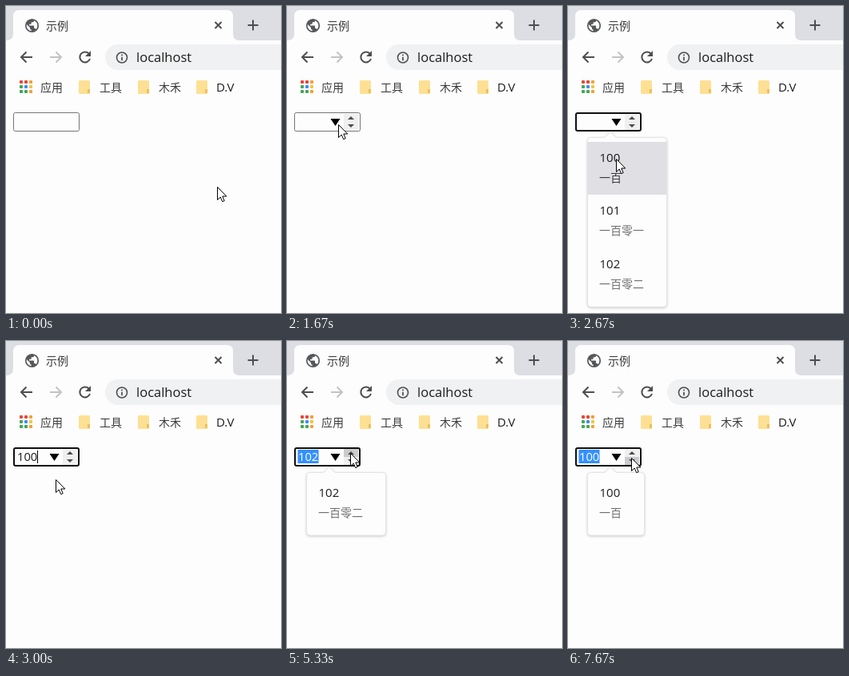
These frames come from a looping animation (344x384 px, 8330 ms). An HTML page:

```html
<!DOCTYPE html>
<html lang="zh">
<head>
<meta charset="utf-8">
<style>
html, body { margin: 0; height: 100%; overflow: hidden; background: #fdfdfd; }
svg { display: block; width: 100vw; height: 100vh; }
text { font: 15px "Open Sans", "Noto Sans CJK SC", "Noto Sans CJK", sans-serif; fill: #1c1c1c; }
.zh { font: 14px "Noto Sans CJK SC", "Noto Sans CJK", sans-serif; fill: #3a3b3d; }
.note { fill: #707070; }
.line { fill: none; stroke: #4c4e50; stroke-width: 2; }
.popup { fill: #fdfdfd; stroke: #e4e4e8; filter: drop-shadow(0 1px 1.5px #0003); }
</style>
</head>
<body>
<svg viewBox="0 0 344 384">
  <!-- tab strip -->
  <path fill="#dddee3" d="M0 0H344V43H292Q284 43 284 35V13Q284 5 276 5H17Q9 5 9 13V35Q9 43 0 43Z"/>
  <g transform="translate(22.200 14.200) scale(.86)">
    <circle cx="12" cy="12" r="10" fill="#55575a"/>
    <path fill="#fdfdfd" d="M11 19.900C7 19.400 4 16 4 12q0-1 .2-1.800L9 15v1q0 2 2 2zM17.900 17.400Q17.400 16 16 16h-1v-3q0-1-1-1H8v-2h2q1 0 1-1V7h2q2 0 2-2v-.4c6 2.600 6 9.400 2.900 12.800z"/>
  </g>
  <text class="zh" x="50" y="30">示例</text>
  <path class="line" d="M261.500 20l8 8M269.500 20l-8 8M309 17.500v13M302.500 24h13"/>
  <!-- toolbar -->
  <path class="line" d="M33 64H19M25.500 57.500L19 64l6.500 6.500"/>
  <path class="line" style="stroke:#c2c3c6" d="M55 64H69M62.500 57.500L69 64l-6.500 6.500"/>
  <path class="line" d="M104 60A6.500 6.500 0 1 0 105 66"/>
  <path fill="#4c4e50" d="M106 56v7h-7z"/>
  <path fill="#f0f1f3" d="M344 48H140a16 16 0 0 0 0 32H344Z"/>
  <circle class="line" cx="145" cy="64.500" r="6.500" style="stroke-width:1.600"/>
  <path class="line" style="stroke-width:1.700" d="M145 60.500v1.800M145 63.700v4.500"/>
  <text x="163" y="70" style="font-size:16.500px">localhost</text>
  <!-- bookmarks -->
  <g id="marks"></g>
  <!-- number field -->
  <rect id="field" fill="#fdfdfd"/>
  <g id="tools">
    <path d="M54.500 141h12l-6 9z" fill="#000"/>
    <rect x="71" y="135" width="18" height="20" fill="#efefef"/>
    <rect id="hot" x="71" width="18" height="10" fill="#cbcbcd"/>
    <path d="M76 142l4-4 4 4zM76 148l4 4 4-4z" fill="#4a4a4a"/>
  </g>
  <rect id="mark" x="13.500" y="136" width="26" height="17" fill="#3390ff"/>
  <text id="value" x="14" y="150" style="font-size:14.700px"></text>
  <path id="caret" stroke="#000" d="M0 137v16"/>
  <g id="list"></g>
  <path id="arrow" fill="#fff" stroke="#000" stroke-linejoin="round"
    d="M.5.5V16.500L4.200 13 6.700 18.700 9.200 17.600 6.800 12H11.800Z"/>
</svg>
<script>
const LOOP = 8330;
const words = { 100: '一百', 101: '一百零一', 102: '一百零二' };
const all = Object.keys(words);
const $ = id => document.getElementById(id);
const set = (id, attrs) => { for (const k in attrs) $(id).setAttribute(k, attrs[k]); };
const show = (id, on) => set(id, { visibility: on ? 'visible' : 'hidden' });

// start time, pointer position, changes to the field that persist
const steps = [
  [0, 264, 226, { value: '', items: [], tools: false, focus: false, caret: false, pick: false, sel: false, hot: 0 }],
  [330, 262, 225],
  [670, 160, 170],
  [1000, 88, 131],
  [1330, 68, 143, { tools: true }],
  [1670, 64, 148],
  [2000, 64, 148, { focus: true, caret: true, items: all }],
  [2330, 62, 174, { pick: true }],
  [2670, 60, 191, { caret: false }],
  [3000, 62, 173, { value: '100', items: [], pick: false, caret: true }],
  [3330, 72, 145, { hot: 135 }],
  [3670, 78, 141, { caret: false }],
  [4000, 79, 140, { caret: true }],
  [4330, 79, 140, { value: '101', items: ['101'], caret: false, sel: true }],
  [5330, 79, 140, { value: '102', items: ['102'] }],
  [6330, 79, 146, { hot: 145 }],
  [6670, 79, 146, { value: '100', items: ['100'] }]
];
let state = {};
const frames = steps.map(([t, x, y, change]) => state = { ...state, ...change, t, x, y });

function drawMarks() {
  const dots = ['#e5473a', '#e5473a', '#f2a03a', '#43a657', '#3f8cf0', '#f4c53a', '#43a657', '#43a657', '#f2a03a'];
  const labels = [[91, '工具'], [165, '木禾'], [238, 'D.V']];
  $('marks').innerHTML = dots.map((c, i) =>
    `<rect x="${17 + i % 3 * 6}" y="${93 + (i / 3 | 0) * 6}" width="4" height="4" rx="1" fill="${c}"/>`).join('') +
    '<text class="zh" x="43" y="107">应用</text>' +
    labels.map(([x, s]) => {
      const latin = s < 'a';
      return `<rect x="${x}" y="93" width="14" height="17" rx="1.5" fill="#fde093"/>
        <path d="M${x + 11} 104h3v5h-3z" fill="#eebf5c"/>
        <text class="${latin ? '' : 'zh'}" x="${x + (latin ? 25 : 26)}" y="107">${s}</text>`;
    }).join('');
}

function listMarkup({ items, pick }) {
  if (!items.length) return '';
  const right = items.some(n => words[n].length > 2) ? 123.5 : 95.5;
  const bottom = 176.5 + items.length * 66.6;
  return `<path class="popup" d="M28.500 164.500H46l7-7 7 7H${right - 4}q4 0 4 4V${bottom - 4}
      q0 4-4 4H28.500q-4 0-4-4V168.500q0-4 4-4Z"/>` +
    (pick ? `<rect x="25" y="170" width="98" height="66" fill="#dfdfe4"/>` : '') +
    items.map((n, i) => {
      const y = Math.floor(195 + i * 66.5);
      return `<text x="39.500" y="${y}">${n}</text>
        <text class="zh ${pick && !i ? '' : 'note'}" x="39" y="${y + 25}">${words[n]}</text>`;
    }).join('');
}

function draw(s) {
  const edge = s.focus ? 1 : .5;
  set('field', {
    x: 9 + edge, y: 133 + edge, width: 83 - 2 * edge, height: 24 - 2 * edge,
    rx: 2, stroke: s.focus ? '#101010' : '#767676', 'stroke-width': 2 * edge
  });
  show('tools', s.tools);
  set('hot', { y: s.hot, opacity: s.hot ? 1 : 0 });
  show('mark', s.sel);
  $('value').textContent = s.value;
  $('value').style.fill = s.sel ? '#fff' : '';
  show('caret', s.caret);
  set('caret', { transform: `translate(${s.value ? 39.5 : 14.5} 0)` });
  $('list').innerHTML = listMarkup(s);
  set('arrow', { transform: `translate(${s.x} ${s.y})` });
}

let last;
function tick() {
  const t = performance.now() % LOOP;
  const now = frames.findLast(f => f.t <= t);
  if (now !== last) draw(last = now);
  requestAnimationFrame(tick);
}
drawMarks();
tick();
</script>
</body>
</html>
```
